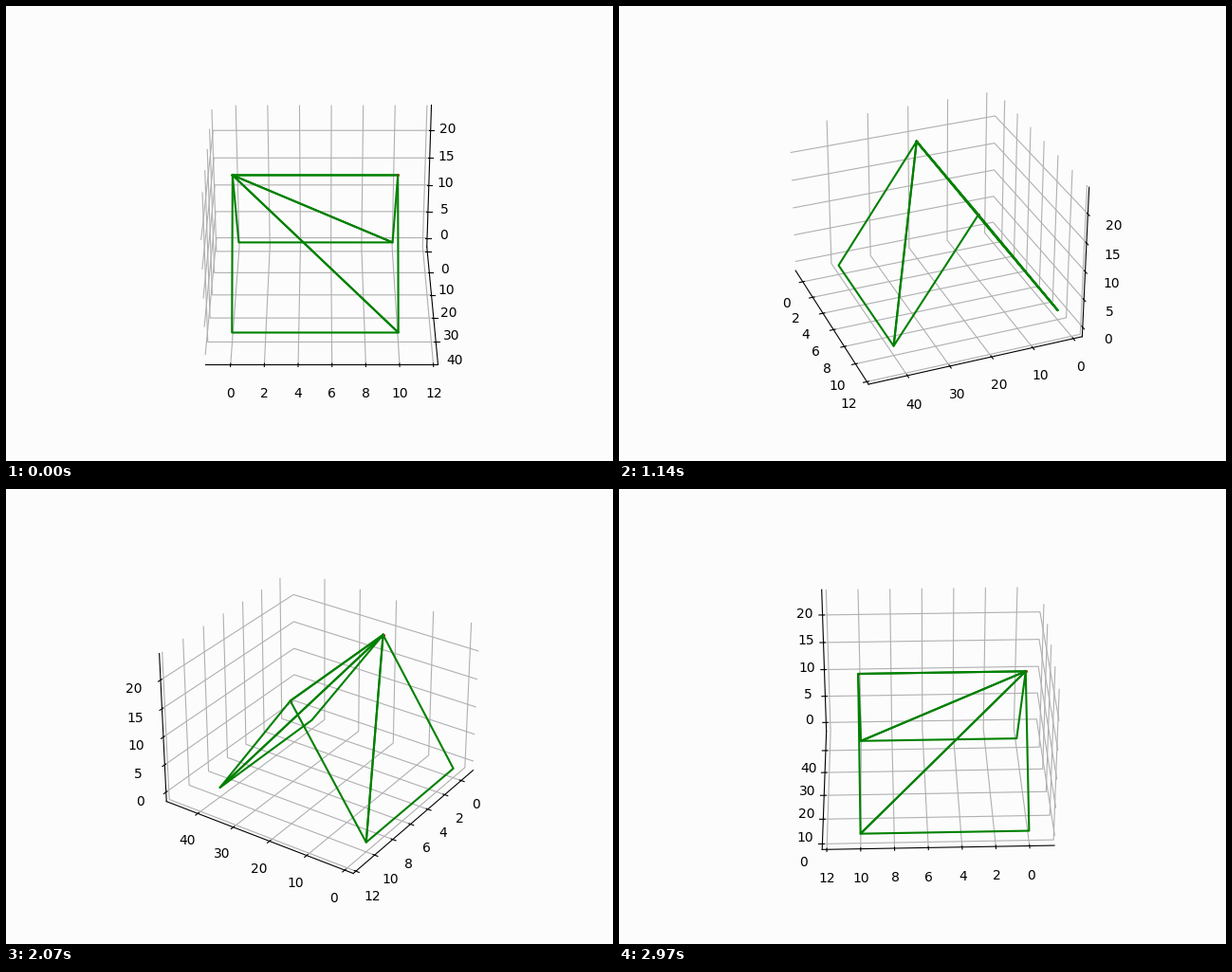
These frames come from a looping animation (640 by 480 pixels, 3 s). A matplotlib script:

```python
import numpy as np
import matplotlib.pyplot as plt
from matplotlib.animation import FuncAnimation

FRAMES = 100
BACKGROUND = "#fcfcfc"


def padded(low, high):
    pad = (high - low) / 48
    return low - pad, high + pad


fig = plt.figure(figsize=(6.4, 4.8), dpi=100, facecolor=BACKGROUND)
ax = fig.add_subplot(projection="3d", facecolor=BACKGROUND)

ax.set_xlim(*padded(-1.2, 12))
ax.set_ylim(*padded(-1.2, 48)[::-1])
ax.set_zlim(*padded(-1.2, 24))
ax.set_xticks(range(0, 13, 2))
ax.set_yticks(range(0, 41, 10))
ax.set_zticks(range(0, 21, 5))

for axis in (ax.xaxis, ax.yaxis, ax.zaxis):
    axis.set_pane_color((1, 1, 1, 0))
ax.xaxis.pane.set_edgecolor("#ebebeb")

# Gable roof: a ridge and two eaves, each slope split into two triangles
ridge = np.array([(0, 20, 20), (10, 20, 20)])
ax.plot(*ridge.T, "o", color="red", ms=2.2, mew=0, zorder=2)
for y in (0, 40):
    left, right = (0, y, 0), (10, y, 0)
    for tri in ((ridge[0], left, right), (ridge[0], right, ridge[1])):
        loop = np.array([*tri, tri[0]])
        ax.plot(*loop.T, color="green", lw=1.5, zorder=3)


def update(frame):
    ax.view_init(elev=30, azim=-90 + 180 * frame / FRAMES)
    return []


anim = FuncAnimation(fig, update, frames=FRAMES, interval=30,
                     init_func=lambda: [], repeat=True, repeat_delay=0)
plt.show()
```
